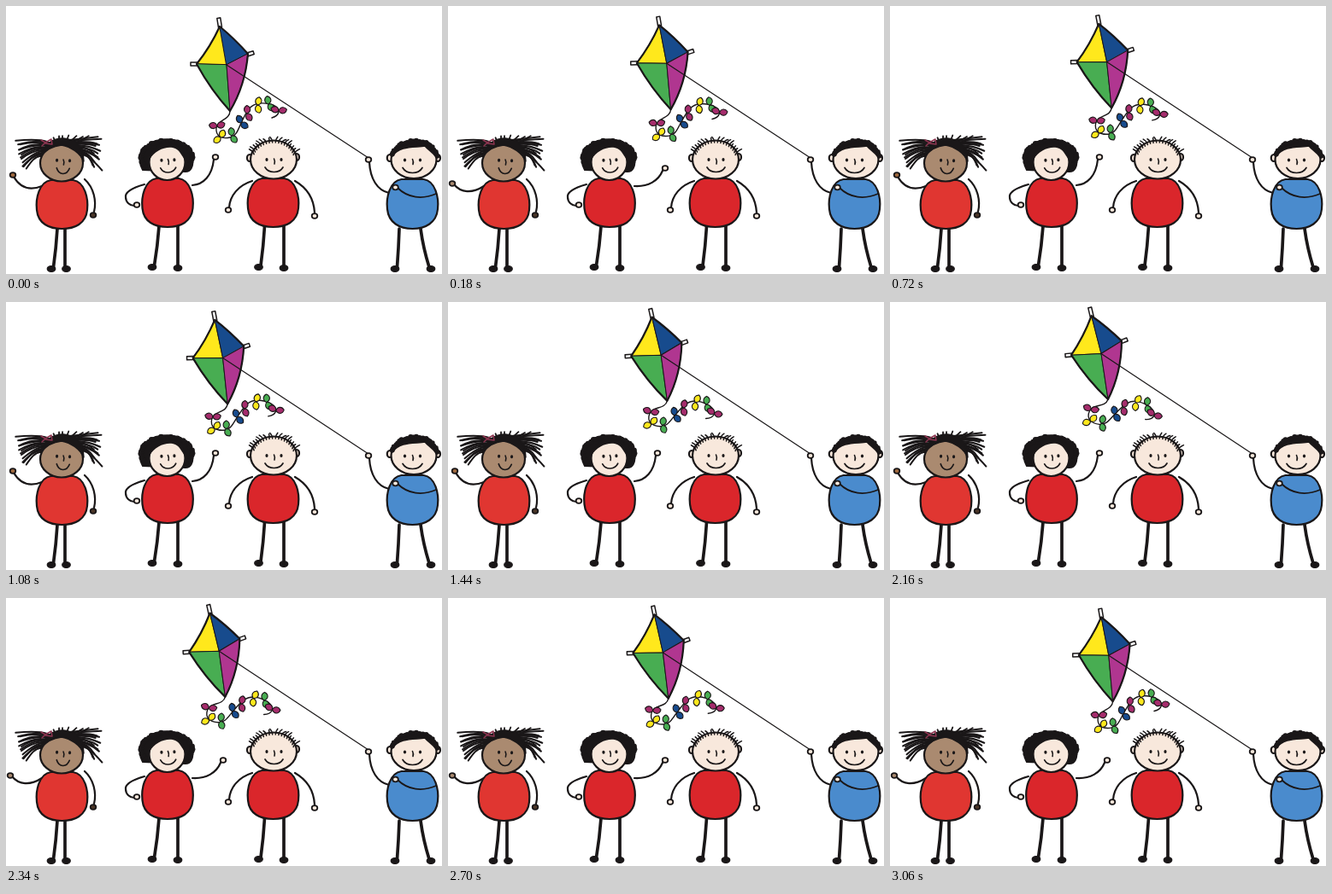
Animation, 510 px wide and 314 px high, one loop 3.24 s. Source, as an HTML page:

```html
<!DOCTYPE html>
<html lang="en">
<head>
<meta charset="utf-8">
<title>Kite friends</title>
<style>
html, body { margin: 0; width: 100%; height: 100%; overflow: hidden; background: #fff; }
svg { display: block; width: 100vw; height: 100vh; }
</style>
</head>
<body>
<svg id="stage" viewBox="0 0 510 314" fill="none" stroke="#1a1718" stroke-width="2.2" stroke-linecap="round" stroke-linejoin="round"></svg>
<script>
const INK = '#1a1718', SKIN = '#f8e8dc', TAN = '#aa8a70', BROWN = '#a0693d', RED = '#da262b', BLUE = '#4a8bcd';
const YELLOW = '#ffe81c', NAVY = '#174b8d', GREEN = '#48ad52', PINK = '#b03690', PLUM = '#a52c6c';
const STEP = 180;
const HEIGHTS = [0, 1, 2, 2, 2, 3, 2, 3, 4, 4, 5, 5, 5, 4, 4, 3, 2, 1];
const stage = document.getElementById('stage');

let seed = 7;
const rand = () => (seed = (seed * 16807) % 2147483647) / 2147483647;
const spread = n => (rand() - 0.5) * 2 * n;

function add(tag, attrs, parent = stage) {
  const el = document.createElementNS('http://www.w3.org/2000/svg', tag);
  for (const k in attrs) el.setAttribute(k, attrs[k]);
  parent.append(el);
  return el;
}
const path = (d, attrs = {}, parent) => add('path', { d, ...attrs }, parent);
const oval = (cx, cy, rx, ry, attrs = {}, parent) => add('ellipse', { cx, cy, rx, ry, ...attrs }, parent);
const group = (attrs = {}, parent) => add('g', attrs, parent);
const hand = (x, y, fill = SKIN, parent) => oval(x, y, 3.3, 2.8, { fill, 'stroke-width': 1.8 }, parent);

function body(cx, y, fill, h = 57) {
  const side = s => [cx + s * 13, cx + s * 27, cx + s * 31, cx + s * 29.5, cx + s * 28, cx + s * 15];
  const [a, b, c, d, e, f] = side(-1), [A, B, C, D, E, F] = side(1);
  path(`M${a} ${y}C${b} ${y + 2} ${c} ${y + 22} ${d} ${y + 35}C${e} ${y + 51} ${f} ${y + h} ${cx} ${y + h}` +
       `C${F} ${y + h} ${E} ${y + 51} ${D} ${y + 35}C${C} ${y + 22} ${B} ${y + 2} ${A} ${y}Z`, { fill });
}

function leg(x, y, fx, fy, dir) {
  path(`M${x} ${y}Q${x + (fx - x) * 0.3} ${(y + fy) / 2} ${fx} ${fy}`, { 'stroke-width': 3.7 });
  oval(fx + dir * 2.5, fy + 2, 4.8, 3.5, { fill: INK, 'stroke-width': 1.2 });
}

function face(x, y, gap, smile, depth, tilt = 0) {
  const g = group({ transform: `translate(${x} ${y}) rotate(${tilt})`, 'stroke-width': 1.7 });
  for (const s of [-1, 1]) oval(s * gap, -2, 1.6, 2, { fill: INK, stroke: 'none' }, g);
  path('M0 -3Q1.5 0 0.5 3', { 'stroke-width': 1.6 }, g);
  path(`M${-smile} 7C${-smile * 0.6} ${7 + depth * 1.33} ${smile * 0.6} ${7 + depth * 1.33} ${smile} 7`, {}, g);
}

// Ring of small curls along an elliptical arc, angles in degrees
function curls(cx, cy, rx, ry, from, to, n, r) {
  for (let i = 0; i <= n; i++) {
    const a = (from + (to - from) * i / n) * Math.PI / 180;
    oval(cx + rx * Math.cos(a) + spread(0.8), cy + ry * Math.sin(a) + spread(0.8), r, r * 0.9, { fill: INK, stroke: 'none' });
  }
}

// Two poses of one arm, swapped on every step
const poses = [[], []];
function wave(pose, d, x, y, fill) {
  const g = group();
  path(d, {}, g);
  hand(x, y, fill, g);
  poses[pose].push(g);
}

function girlWithSpikes() {
  wave(0, 'M42 211C27 217 16 212 9 200', 8, 198, BROWN);
  wave(1, 'M42 211C28 220 15 219 7 209', 5, 208, TAN);
  path('M92 203C103 213 106 229 103 241');
  hand(102, 245, '#4a3527');
  leg(60, 261, 55.5, 306, -1);
  leg(69, 261, 69, 306, 0.6);
  body(65.5, 204, '#e03631');
  for (let i = 0; i < 14; i++) {
    const t = i / 13;
    const x = 50 - t * 8 + spread(2), y = 159 + t * 17;
    path(`M${x} ${y}Q${34 + spread(3)} ${y - 4 + t * 3} ${13 + t * 10 + spread(4)} ${159 + t * 33 + spread(2)}`, { 'stroke-width': 2 });
    path(`M${74 + t * 14} ${157 + t * 17}Q${94 + spread(3)} ${155 + t * 19} ${107 + spread(7)} ${154 + t * 37 + spread(2)}`, { 'stroke-width': 2.1 });
  }
  for (let i = 0; i < 7; i++)
    path(`M${58 + i * 4} 160L${54 + i * 7 + spread(2)} ${153 + spread(1.5)}`, { 'stroke-width': 1.8 });
  oval(65, 184, 25, 21.5, { fill: TAN });
  path('M41 176C44 163 53 155 67 155C81 156 91 166 91 182C86 172 76 165 65 163C56 164 47 168 41 176Z', { fill: INK, 'stroke-width': 1.4 });
  path('M41 157l5 3l-4 4M46 160l7 -4l1 6l-8 -1', { stroke: '#8d3550', 'stroke-width': 1.5 });
  face(67, 183, 7.5, 7.5, 6.5, 2);
}

function girlWithBob() {
  path('M162 209C148 213 139 218 140 224C140 230 145 234 150 234');
  hand(153, 233);
  wave(0, 'M218 210C231 209 241 199 243 180', 245, 177);
  wave(1, 'M218 211C234 212 246 205 251 193', 254, 190);
  leg(179, 258, 173.5, 304, -1);
  leg(201, 258, 201, 305, 0);
  body(189, 202, RED);
  path('M160 192C152 178 161 160 180 157C202 154 217 164 218 180C219 188 216 194 210 194Z', { fill: INK });
  curls(188, 177, 29.5, 19, 142, 400, 34, 3.3);
  oval(188.5, 183, 21, 21, { fill: SKIN });
  path('M168 180C169 169 177 161 189 160C201 161 210 171 211 183C206 176 203 169 198 167C190 163 174 168 168 180Z', { fill: INK, stroke: 'none' });
  face(189.5, 182.5, 7.5, 9, 5.5, -2);
}

function boyWithTufts() {
  path('M288 205C272 210 262 222 261 236');
  hand(260, 239);
  path('M338 205C352 213 360 226 361 242');
  hand(361, 246);
  leg(302.5, 258, 298, 304, -1);
  leg(325, 258, 325, 305, 0);
  body(312.5, 202, RED);
  oval(285, 178, 3, 4, { fill: SKIN });
  oval(340, 177, 3, 4, { fill: SKIN });
  oval(313, 180, 27, 22.5, { fill: SKIN });
  for (let i = 0; i < 18; i++) {
    const a = (198 + i * 8.6) * Math.PI / 180;
    const x = 313 + 24 * Math.cos(a), y = 180 + 20 * Math.sin(a), lean = 7 * Math.cos(a);
    path(`M${x} ${y}q${lean * 0.2} -4 ${lean + spread(3)} ${-5 - rand() * 2}`, { 'stroke-width': 1.5 });
  }
  face(313.5, 182, 8.5, 10.5, 5.5);
}

function boyWithKite() {
  path('M448 219C434 216 426 202 425 183');
  hand(424, 180);
  leg(460, 261, 457.5, 306, -1);
  leg(485, 261, 495, 306, 0.8);
  body(475.5, 203, BLUE, 58);
  path('M503 220C487 227 470 225 458 213', { 'stroke-width': 1.8 });
  hand(455.5, 212.5);
  oval(449, 178, 3.2, 4, { fill: SKIN });
  oval(505, 178, 3, 4, { fill: SKIN });
  oval(477, 180, 26.5, 22, { fill: SKIN });
  path('M452 176C455 162 465 158 478 158C493 158 502 166 504 178C499 171 494 169 490 164C479 166 460 163 452 176Z', { fill: INK, 'stroke-width': 1.5 });
  curls(478, 177, 26, 19, 188, 355, 21, 3);
  face(475.5, 182.5, 9, 11.5, 6);
}

// Local origin is where the string is tied
function buildKite() {
  const kite = group();
  const bar = (x, y, angle, len) => add('rect', {
    x: 0, y: -2, width: len, height: 4, fill: '#fff', 'stroke-width': 1.5,
    transform: `translate(${x} ${y}) rotate(${angle})`
  }, kite);
  bar(-7.5, -44, -99, 11);
  bar(-34, -1, 180, 8);
  bar(24, -12, -17, 8);
  const thin = { 'stroke-width': 1 };
  path('M-8 -45Q-19 -21 -35 -1L0 0Z', { fill: YELLOW, ...thin }, kite);
  path('M-8 -45Q9 -31 25 -13L0 0Z', { fill: NAVY, ...thin }, kite);
  path('M-35 -1Q-18 30 4 54L0 0Z', { fill: GREEN, ...thin }, kite);
  path('M25 -13Q22 24 4 54L0 0Z', { fill: PINK, ...thin }, kite);
  path('M-8 -45Q9 -31 25 -13Q22 24 4 54Q-18 30 -35 -1Q-19 -21 -8 -45Z', {}, kite);
  return kite;
}

// Local origin is the lower corner of the kite
function buildTail() {
  const tail = group();
  path('M0 0C0 11 -15 10 -16 20C-17 30 -9 33 0 31C9 29 10 19 15 10C20 0 23 -7 34 -9C47 -10 57 -6 57 1Q56 6 49 8', { 'stroke-width': 1.4 }, tail);
  const bows = [
    [-15, 18, PLUM, 0], [-11, 31, YELLOW, -45], [2, 29, GREEN, 75], [13, 14, NAVY, 55],
    [20, 3, PLUM, 80], [32, -7, YELLOW, 95], [45, -8, GREEN, 70], [57, 0, PLUM, 10]
  ];
  for (const [x, y, fill, angle] of bows) {
    const g = group({ transform: `translate(${x} ${y}) rotate(${angle})`, fill, 'stroke-width': 1.1 }, tail);
    for (const turn of [-15, 195])
      path('M0 0C2 -5 7 -5 9.5 -1C8 4 3 5 0 0Z', { transform: `rotate(${turn})` }, g);
  }
  return tail;
}

const tail = buildTail();
const kite = buildKite();
const string = path('', { 'stroke-width': 1.2 });
girlWithSpikes();
girlWithBob();
boyWithTufts();
boyWithKite();

function draw(ms) {
  const i = Math.floor(ms / STEP) % HEIGHTS.length;
  const h = HEIGHTS[i];
  const x = 258 - 2.2 * h, y = 69 - 1.7 * h;
  const turn = -0.86 * h, a = turn * Math.PI / 180;
  const bx = x + 4 * Math.cos(a) - 54 * Math.sin(a);
  const by = y + 4 * Math.sin(a) + 54 * Math.cos(a);
  kite.setAttribute('transform', `translate(${x} ${y}) rotate(${turn})`);
  tail.setAttribute('transform', `translate(${bx} ${by}) rotate(${3.8 * h})`);
  string.setAttribute('d', `M${x} ${y}L424 178`);
  poses.forEach((arms, p) => arms.forEach(arm => arm.setAttribute('display', p === i % 2 ? 'inline' : 'none')));
}

const start = performance.now();
function tick() {
  draw(performance.now() - start);
  requestAnimationFrame(tick);
}
draw(0);
requestAnimationFrame(tick);
</script>
</body>
</html>
```
